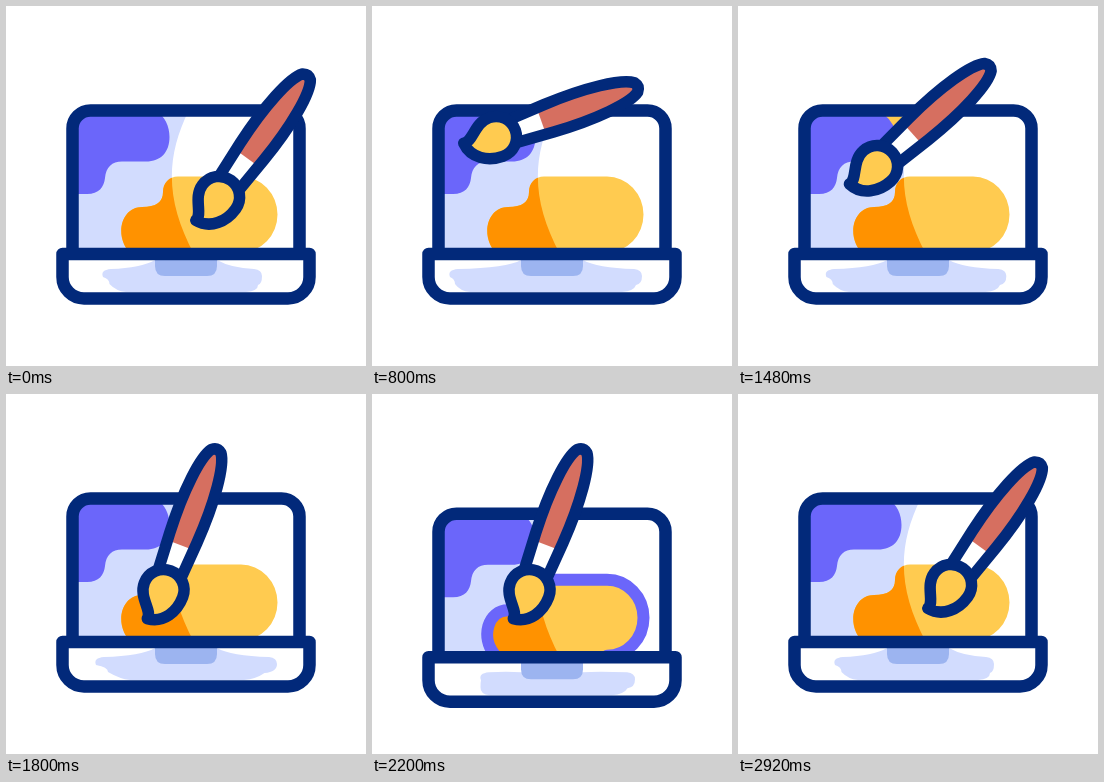
Recreate the animation shown at these times as an HTML page with a canvas. Size 360 by 360 pixels, loop 3000 ms.

```html
<!DOCTYPE html>
<html lang="en">
<head>
<meta charset="utf-8">
<title>Laptop and paintbrush</title>
<style>
  html, body { margin: 0; width: 100%; height: 100%; overflow: hidden; background: #fff; }
  canvas { display: block; width: 100vmin; height: 100vmin; }
</style>
</head>
<body>
<canvas id="stage"></canvas>
<script>
const LOOP = 3000, STEP = 40, SIZE = 360;
const NAVY = '#02297a', PURPLE = '#6b66fa', LIGHT = '#d2dcfe', TAB = '#9cb4f0';
const YELLOW = '#ffcb50', ORANGE = '#ff9200', RED = '#d66f60', WHITE = '#fff';

const canvas = document.getElementById('stage');
const ctx = canvas.getContext('2d');

const PURPLE_EDGE = 'M60 188 H81 C93 188 98 181 99 172 C100 161 106 155.5 116 155.5 ' +
  'H140 C155 155.5 163.5 146 163.5 131 C163.5 120 159 111 150 104';
const YELLOW_EDGE = 'M123 246 C108 228 116 201 136 201 C150 201 157 196 157 186 ' +
  'C157 177 163 170.5 172 170.5 H235 A36.5 38 0 0 1 235 246.5';

const purpleArea = new Path2D(PURPLE_EDGE + ' L60 104 Z');
const yellowArea = new Path2D(YELLOW_EDGE + ' Z');
const leftSide = new Path2D('M60 100 H185 C159 150 159 194 188 248 H60 Z');
const screen = new Path2D('M66.5 248 V122.5 A18 18 0 0 1 84.5 104.5 H275.5 A18 18 0 0 1 293.5 122.5 V248');
const base = new Path2D('M56.5 248 H303.5 V271 A21.5 21.5 0 0 1 282 292.5 H78 A21.5 21.5 0 0 1 56.5 271 Z');
const tab = new Path2D('M149 250 H211 V260 Q211 270 201 270 H159 Q149 270 149 260 Z');
const handle = new Path2D('M-12 -16 L-14.5 -56 C-17 -100 -13 -138 -5 -148.5 Q0 -152.5 5 -148.5 ' +
  'C13 -138 17 -100 14.5 -56 L12 -16 Z');
const head = new Path2D('M0 -20.5 C11.5 -20.5 20.5 -11.5 20.5 0 C20.5 15 12 31 -5 32.5 ' +
  'C-3 23 -20.5 16 -20.5 0 C-20.5 -11.5 -11.5 -20.5 0 -20.5 Z');

function outline(d, color, start) {
  const node = document.createElementNS('http://www.w3.org/2000/svg', 'path');
  node.setAttribute('d', d);
  return { path: new Path2D(d), length: node.getTotalLength(), color, start };
}
const outlines = [outline(PURPLE_EDGE, YELLOW, 800), outline(YELLOW_EDGE, PURPLE, 1800)];

// Head centre x, y and tilt in degrees.
const RIGHT = [213, 191, 36], TOP = [124, 131, 70.5], LOW = [157.5, 196, 20.8];
const moves = [
  { from: RIGHT, to: TOP, start: 200, end: 800, sag: 0 },
  { from: TOP, to: LOW, start: 1200, end: 1800, sag: 0 },
  { from: LOW, to: RIGHT, start: 2200, end: 2700, sag: 4 }
];

// Time, then x of the reflection's top left, bottom left, top right, bottom right.
const reflections = [
  [200, 97, 110, 256, 248], [800, 78, 88, 270, 258], [1200, 87, 90, 266, 264],
  [1800, 90, 114, 271, 246], [2200, 109, 108, 263, 248], [2480, 122, 116, 256, 247],
  [2920, 97, 110, 256, 248]
];

const mix = (a, b, u) => a + (b - a) * u;
const progress = (t, start, end) => Math.min(1, Math.max(0, (t - start) / (end - start)));
const ease = u => (1 - Math.cos(Math.PI * u)) / 2;

function dip(t) {
  const wave = start => ease(2 * progress(t, start, start + 600));
  return 20.3 * (wave(800) + wave(1800));
}

function fill(path, color) {
  ctx.fillStyle = color;
  ctx.fill(path);
}

function stroke(path, color = NAVY, width = 12.5) {
  ctx.strokeStyle = color;
  ctx.lineWidth = width;
  ctx.stroke(path);
}

function drawOutline({ path, length, color, start }, t) {
  const tail = ease(progress(t, start + 400, start + 800));
  const front = ease(progress(t, start, start + 400));
  if (front <= tail) return;
  ctx.save();
  ctx.setLineDash([(front - tail) * length, length * 2]);
  ctx.lineDashOffset = -tail * length;
  stroke(path, color, 12);
  ctx.restore();
}

function drawReflection(t) {
  let i = reflections.findIndex(k => k[0] > t);
  if (i < 0) i = reflections.length;
  const a = reflections[Math.max(0, i - 1)];
  const b = reflections[Math.min(i, reflections.length - 1)];
  const u = a === b ? 0 : progress(t, a[0], b[0]);
  const [lt, lb, rt, rb] = [1, 2, 3, 4].map(n => mix(a[n], b[n], u));
  const ml = (lt + lb) / 2, mr = (rt + rb) / 2;
  // The crown flattens as the laptop sinks.
  const crown = Math.min(263, 254 + 0.6 * dip(t));
  fill(new Path2D(`M${lt + 8} 263 Q${lt - 3} 264 ${lt} 271 Q${ml} 273 ${ml} 278 ` +
    `Q${lb} 285 ${lb + 10} 286 H${rb - 8} Q${rb + 4} 285 ${mr} 279 ` +
    `Q${rt} 278 ${rt} 270 Q${rt} 264 ${rt - 8} 263 Q225 262 211 ${crown} ` +
    `H149 Q135 262 ${lt + 8} 263 Z`), LIGHT);
}

function drawLaptop(t) {
  ctx.save();
  ctx.translate(0, dip(t));
  fill(screen, WHITE);
  ctx.save();
  ctx.clip(screen);
  fill(leftSide, LIGHT);
  fill(purpleArea, PURPLE);
  fill(yellowArea, YELLOW);
  ctx.save();
  ctx.clip(leftSide);
  fill(yellowArea, ORANGE);
  ctx.restore();
  outlines.forEach(o => drawOutline(o, t));
  ctx.restore();
  stroke(screen);
  fill(base, WHITE);
  drawReflection(t);
  fill(tab, TAB);
  stroke(base);
  ctx.restore();
}

function brushPose(t) {
  const move = moves.filter(m => t >= m.start).pop();
  if (!move) return RIGHT;
  const u = ease(progress(t, move.start, move.end));
  const sag = move.sag * 4 * u * (1 - u);
  return move.from.map((v, n) => mix(v, move.to[n], u) + (n < 2 ? sag : 0));
}

function drawBrush(t) {
  const [x, y, tilt] = brushPose(t);
  ctx.save();
  ctx.translate(x, y);
  ctx.rotate(tilt * Math.PI / 180);
  fill(handle, WHITE);
  ctx.save();
  ctx.clip(handle);
  ctx.fillStyle = RED;
  ctx.fillRect(-20, -160, 40, 112);
  ctx.restore();
  stroke(handle, NAVY, 11.5);
  fill(head, YELLOW);
  stroke(head, NAVY, 11.5);
  ctx.restore();
}

function draw(now) {
  const pixels = Math.round(Math.min(innerWidth, innerHeight) * devicePixelRatio) || SIZE;
  if (canvas.width !== pixels) canvas.width = canvas.height = pixels;
  const t = Math.floor((now % LOOP) / STEP) * STEP;
  ctx.setTransform(pixels / SIZE, 0, 0, pixels / SIZE, 0, 0);
  ctx.lineJoin = ctx.lineCap = 'round';
  ctx.fillStyle = WHITE;
  ctx.fillRect(0, 0, SIZE, SIZE);
  drawLaptop(t);
  drawBrush(t);
  requestAnimationFrame(draw);
}

draw(0);
</script>
</body>
</html>
```
